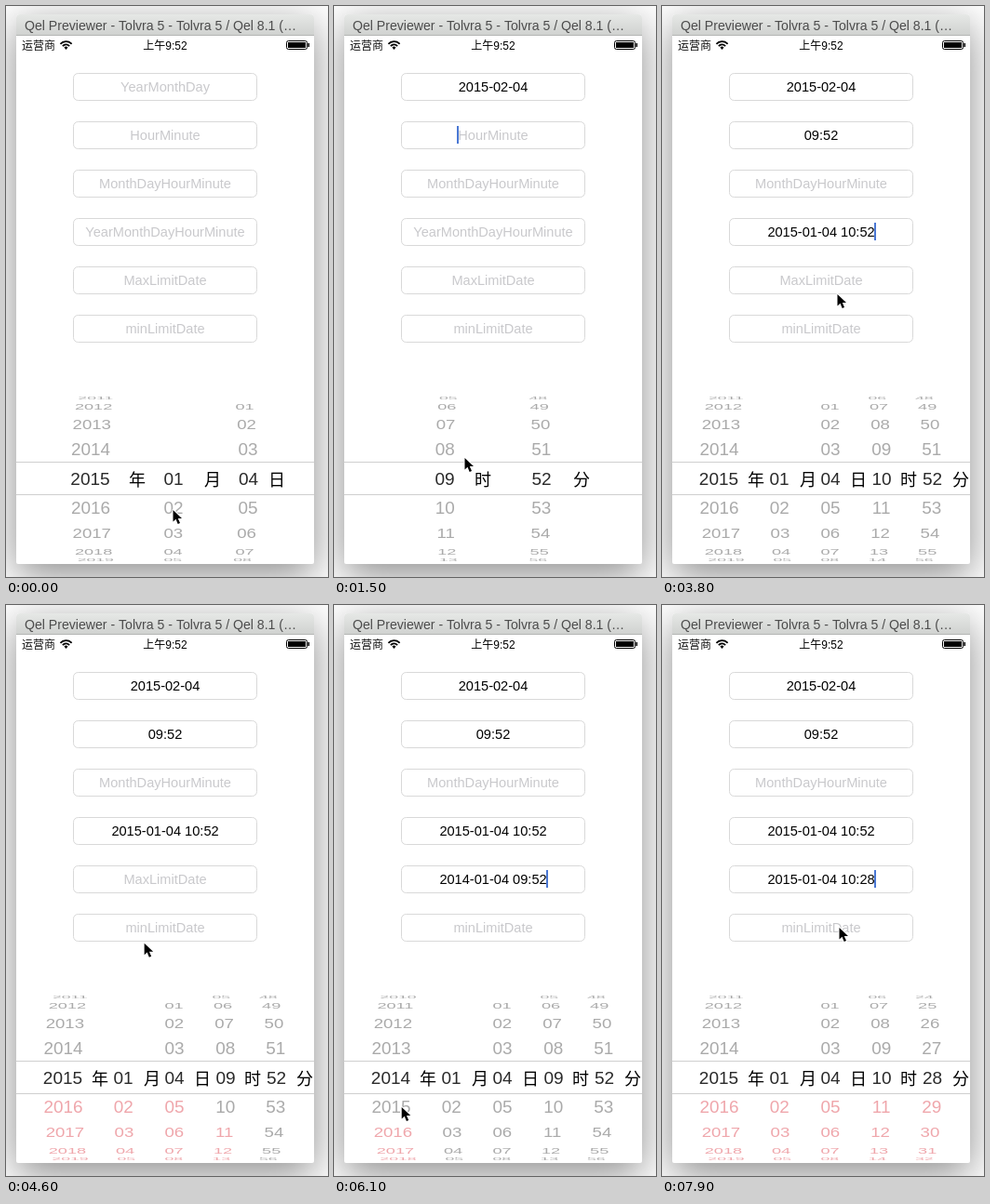
Recreate the animation shown at these times as an HTML page with a canvas. Size 346 px wide and 614 px high, loop 8 s.

```html
<!DOCTYPE html>
<html lang="zh">
<head>
<meta charset="utf-8">
<style>
html, body { margin: 0; width: 100%; height: 100%; overflow: hidden; background: #fff; }
canvas { display: block; width: 346px; height: 614px; }
</style>
</head>
<body>
<canvas></canvas>
<script>
const LOOP = 8000, STEP = 100;
const SANS = '"Liberation Sans", sans-serif';
const CJK = '"Noto Sans CJK SC", "Noto Sans CJK", sans-serif';
const canvas = document.querySelector('canvas');
const dpr = window.devicePixelRatio || 1;
canvas.width = 346 * dpr;
canvas.height = 614 * dpr;
const ctx = canvas.getContext('2d');

// Eased keyframes: [time, value, time, value, ...]
function track(t, keys) {
  if (t <= keys[0]) return keys[1];
  for (let i = 2; i < keys.length; i += 2) {
    if (t < keys[i]) {
      const u = (t - keys[i - 2]) / (keys[i] - keys[i - 2]);
      return keys[i - 1] + (keys[i + 1] - keys[i - 1]) * u * u * (3 - 2 * u);
    }
  }
  return keys[keys.length - 1];
}

// Last entry whose start time has been reached
const current = (t, entries) => entries.filter(e => t >= e[0]).pop();

function text(str, x, y, font, color, align = 'center') {
  ctx.font = font;
  ctx.fillStyle = color;
  ctx.textAlign = align;
  ctx.fillText(str, x, y);
}

function drawWindow() {
  ctx.fillStyle = '#fff';
  ctx.fillRect(0, 0, 346, 614);
  ctx.save();
  ctx.shadowColor = 'rgba(0,0,0,.45)';
  ctx.shadowBlur = 44 * dpr;
  ctx.shadowOffsetY = 12 * dpr;
  ctx.beginPath();
  ctx.roundRect(11, 9, 320, 591, [4, 4, 2, 2]);
  ctx.fill();
  ctx.restore();

  const bar = ctx.createLinearGradient(0, 9, 0, 32);
  bar.addColorStop(0, '#e6e8e6');
  bar.addColorStop(1, '#cfd1cf');
  ctx.fillStyle = bar;
  ctx.beginPath();
  ctx.roundRect(11, 9, 320, 23, [4, 4, 0, 0]);
  ctx.fill();
  ctx.fillStyle = '#b4b6b4';
  ctx.fillRect(11, 31, 320, 1);
  text('Qel Previewer - Tolvra 5 - Tolvra 5 / Qel 8.1 (…', 20, 26, '14.1px ' + SANS, '#4c4c4c', 'left');
}

function drawStatusBar() {
  text('运营商', 17, 46.5, '12px ' + CJK, '#111', 'left');
  text('上午9:52', 171, 46.5, '500 12px "Liberation Sans", ' + CJK, '#000');
  ctx.strokeStyle = ctx.fillStyle = '#000';
  ctx.lineWidth = 1.8;
  for (const r of [5, 8.3]) {
    ctx.beginPath();
    ctx.arc(64.5, 46.5, r, -Math.PI * .76, -Math.PI * .24);
    ctx.stroke();
  }
  ctx.beginPath();
  ctx.moveTo(64.5, 47);
  ctx.arc(64.5, 46.5, 2.8, -Math.PI * .76, -Math.PI * .24);
  ctx.fill();
  ctx.lineWidth = 1;
  ctx.beginPath();
  ctx.roundRect(301.5, 37.5, 22, 9, 2);
  ctx.stroke();
  ctx.fillRect(303, 39, 19, 6);
  ctx.fillRect(324.5, 40, 1.5, 4);
}

const HINTS = ['YearMonthDay', 'HourMinute', 'MonthDayHourMinute',
  'YearMonthDayHourMinute', 'MaxLimitDate', 'minLimitDate'];

// [time, field, text]
const ENTRIES = [
  [700, 0, '2015-02-04'], [2200, 1, '09:52'], [3400, 3, '2015-01-04 10:52'],
  [6000, 4, '2014-01-04 09:52'], [7500, 4, '2015-01-04 10:28']
];

// [time, field, blink phase]
const FOCUS = [[0, 0, -700], [1000, 1, 1000], [2600, 3, 800], [4200, 4, 3850]];

function drawFields(t) {
  const [, focused, phase] = current(t, FOCUS);
  HINTS.forEach((hint, i) => {
    const y = 72 + 52 * i;
    const entry = current(t, ENTRIES.filter(e => e[1] === i));
    const label = entry ? entry[2] : hint;
    ctx.strokeStyle = '#d9d9d9';
    ctx.lineWidth = 1;
    ctx.beginPath();
    ctx.roundRect(72.5, y + .5, 197, 29, 5);
    ctx.stroke();
    text(label, 171, y + 20, '14.6px ' + SANS, entry ? '#000' : '#c9c9cc');
    if (i === focused && (t - phase) % 1000 < 600) {
      const half = ctx.measureText(label).width / 2;
      ctx.fillStyle = '#4a78d4';
      ctx.fillRect(Math.round(171 + (entry ? half - 1 : -half - 1)), y + 5, 2, 19);
    }
  });
}

const LIMIT = [2015, 1, 4, 10, 28];
const RANGES = { 年: [1970, 2050], 月: [1, 12], 日: [1, 31], 时: [0, 23], 分: [0, 59] };

// Columns: [unit, number x, unit x, position]
function pickerColumns(t, focused) {
  if (focused === 0) return [
    ['年', 90.5, 141, 2015], ['月', 180, 222, track(t, [100, 1, 500, 2])], ['日', 260.5, 291, 4]
  ];
  if (focused === 1) return [
    ['时', 119, 160, track(t, [1600, 9, 1900, 8.4, 2200, 9])], ['分', 223, 266, 52]
  ];
  const max = focused === 4;
  return [
    ['年', 61, 101, max ? track(t, [5400, 2015, 5900, 2014, 6300, 2014, 6800, 2015.81,
      7000, 2016, 7100, 2016, 7400, 2015]) : 2015],
    ['月', 126, 157, 1],
    ['日', 181, 211, 4],
    ['时', 236, 265, max ? track(t, [7100, 9, 7500, 10]) : track(t, [2900, 9, 3300, 10])],
    ['分', 290.5, 321, max ? track(t, [7100, 52, 7600, 28]) : 52]
  ];
}

// Rows lie on a cylinder seen with slight perspective
function drawColumn([unit, x, , pos], isRed) {
  const [lo, hi] = RANGES[unit];
  for (let v = Math.max(lo, Math.ceil(pos - 4.6)); v <= Math.min(hi, pos + 4.6); v++) {
    const angle = (v - pos) * 19.3 * Math.PI / 180;
    const depth = 1 / (1 + .1 * (1 - Math.cos(angle)));
    ctx.save();
    ctx.translate(171 + (x - 171) * depth, 508.5 + 95.9 * Math.sin(angle) * depth);
    ctx.scale(depth, depth * Math.cos(angle));
    text(String(v).padStart(2, '0'), 0, 6.8, '19px ' + SANS, isRed(v) ? '#d8202c' : '#2a2a2a');
    ctx.restore();
  }
}

function drawPicker(t) {
  const focused = current(t, FOCUS)[1];
  const columns = pickerColumns(t, focused);
  const chosen = columns.map(c => Math.round(c[3]));
  if (focused === 4 && t >= 5900) chosen[0] = t < 7100 ? 2014 : 2015;

  const bands = [[419, 71, .4], [490, 36, 1], [526, 71, .4]];
  for (const [top, height, alpha] of bands) {
    ctx.save();
    ctx.beginPath();
    ctx.rect(11, top, 320, height);
    ctx.clip();
    ctx.globalAlpha = alpha;
    columns.forEach((column, i) => {
      const atLimit = focused === 4 && LIMIT.slice(0, i).every((n, k) => chosen[k] === n);
      drawColumn(column, v => atLimit && v > LIMIT[i]);
      if (alpha === 1) text(column[0], column[2], 515.5, '18px ' + CJK, '#000');
    });
    ctx.restore();
  }
  ctx.fillStyle = '#cfcfcf';
  ctx.fillRect(11, 490, 320, 1);
  ctx.fillRect(11, 525, 320, 1);
}

const POINTER_X = [0, 179, 600, 179, 1000, 160, 1200, 160, 1500, 140, 1700, 122, 2200, 122,
  2600, 220, 2700, 220, 2900, 238, 3400, 238, 3800, 188, 4000, 182, 4300, 182,
  5100, 75, 6300, 72, 6800, 70, 7100, 70, 7700, 189, 7900, 190];
const POINTER_Y = [0, 541, 100, 541, 500, 509, 600, 509, 1000, 138, 1200, 138, 1500, 485,
  1900, 505, 2200, 505, 2600, 251, 2700, 251, 2900, 540, 3300, 508, 3400, 508,
  3800, 309, 4000, 295, 4300, 295, 5100, 509, 5400, 509, 5900, 540, 6300, 538,
  6800, 480, 7000, 474, 7100, 474, 7700, 345, 7900, 346];

function drawPointer(t) {
  ctx.save();
  ctx.translate(track(t, POINTER_X), track(t, POINTER_Y));
  ctx.lineJoin = 'round';
  ctx.lineWidth = 2;
  ctx.strokeStyle = '#fff';
  ctx.fillStyle = '#000';
  const arrow = new Path2D('M.5 1V13.5L3.5 10.8 5.7 16 8 15 5.8 10H10Z');
  ctx.stroke(arrow);
  ctx.fill(arrow);
  ctx.restore();
}

function draw(now) {
  const t = Math.floor((now % LOOP) / STEP) * STEP;
  ctx.setTransform(dpr, 0, 0, dpr, 0, 0);
  drawWindow();
  drawStatusBar();
  drawFields(t);
  drawPicker(t);
  drawPointer(t);
  requestAnimationFrame(() => draw(performance.now() - start));
}

const start = performance.now();
draw(0);
</script>
</body>
</html>
```
